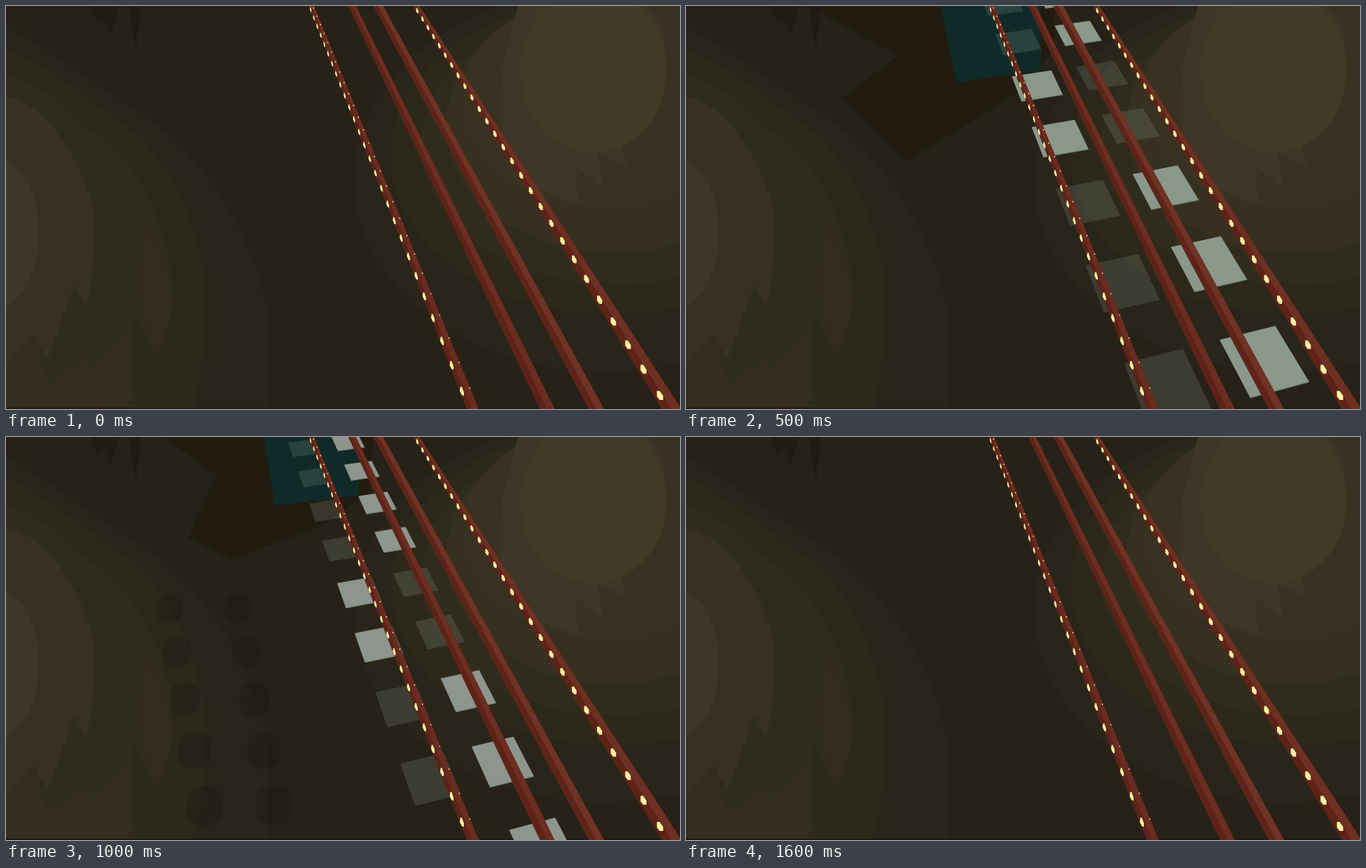
An HTML page for the animation above (1.7 s loop, 967x579 px).

```html
<!DOCTYPE html>
<html lang="en">
<head>
<meta charset="utf-8">
<title>Night rails</title>
<style>
html, body { margin: 0; width: 100%; height: 100%; overflow: hidden; background: #262217; }
svg { display: block; width: 967px; height: 579px; }
</style>
</head>
<body>
<svg viewBox="0 0 967 579" xmlns="http://www.w3.org/2000/svg">
  <rect width="967" height="579" fill="#262217"/>
  <g id="leftGlow">
    <path fill="#28251a" d="M0 30C60 60 150 130 200 160C290 220 370 350 378 470L375 579H0Z"/>
    <path fill="#2c291b" d="M0 60C70 90 150 160 190 185C250 250 285 340 286 430Q285 520 268 579H0Z"/>
    <path fill="#302c1d" d="M0 100C60 110 100 170 150 200C200 250 238 330 239 410Q236 480 215 503L182 440L188 579H0Z"/>
    <path fill="#342d1e" d="M0 579V520L38 470L60 545Q100 500 130 520L180 460V579Z"/>
    <path fill="#332b1d" d="M205 310Q240 380 238 430Q225 500 214 500Q190 440 190 380Z"/>
    <path fill="#383122" d="M0 130C50 140 100 200 125 290Q130 370 115 430L98 400L60 507L38 470L0 520Z"/>
    <path fill="#3e3626" d="M0 222C30 230 47 280 47 325C47 380 25 420 0 432Z"/>
  </g>
  <g id="rightGlow">
    <ellipse cx="860" cy="250" rx="360" ry="275" fill="#28251a"/>
    <ellipse cx="870" cy="215" rx="318" ry="228" fill="#2c291b"/>
    <ellipse cx="875" cy="200" rx="280" ry="200" fill="#302c1d"/>
    <ellipse cx="870" cy="170" rx="238" ry="185" fill="#353020"/>
    <ellipse cx="860" cy="135" rx="205" ry="155" fill="#393222"/>
    <path fill="#3e3626" d="M735 0Q700 100 712 190Q740 270 820 282L818 230L855 262L850 210L890 232L880 190Q950 150 948 80Q945 20 920 0Z"/>
    <ellipse cx="843" cy="92" rx="105" ry="118" fill="#423a29"/>
  </g>
  <path fill="#201c13" d="M121 0L131 27L141 20L151 40L162 0ZM175 0L187 70L194 0Z"/>
  <rect y="577" width="967" height="2" fill="#22170f"/>
  <g id="tower">
    <polygon id="shade" fill="#20170d" fill-opacity=".6"/>
    <g id="spots" fill="#000" fill-opacity=".13"></g>
    <polygon id="block" fill="#0f2a28"/>
    <g id="windows"></g>
  </g>
  <g id="rails"></g>
  <g id="lamps" fill="#fbf3a0"></g>
</svg>
<script>
const FRAME = 100, COUNT = 17;
const ROWS = [-4, 9], LIT_LEFT = [-3, 0, 5, 6], DIM_RIGHT = [-3, 0, 5, 6];
const $ = id => document.getElementById(id);

function add(parent, tag, attrs) {
  const el = document.createElementNS('http://www.w3.org/2000/svg', tag);
  for (const k in attrs) el.setAttribute(k, attrs[k]);
  return parent.appendChild(el);
}
const join = pts => pts.map(p => p[0].toFixed(1) + ',' + p[1].toFixed(1)).join(' ');

// A straight beam: left and right x at the top and bottom, split in two tones.
function rail(a, b, c, d, split, dark, light) {
  const m = a + (b - a) * split, n = c + (d - c) * split;
  add($('rails'), 'polygon', { points: join([[a, 0], [b, 0], [d, 579], [c, 579]]), fill: dark });
  add($('rails'), 'polygon', { points: join([[m, 0], [b, 0], [d, 579], [n, 579]]), fill: light });
}
rail(434, 442, 661, 678, .45, '#5c2318', '#6b2c20');
rail(491, 502, 766, 787, .5, '#5d2318', '#6b2e21');
rail(527, 541, 836, 858, .5, '#5e2419', '#6e3324');
rail(584, 593, 941, 969, .5, '#5d2218', '#6d3022');

// Lamps shrink towards the horizon, evenly spaced in depth.
function lamps(x0, y0, y1, slope, shape, speck) {
  const far = y0 + 665, near = y1 + 665, n = 26;
  const c = n * near / (near - far), k = far * c;
  for (let i = 0; i <= n; i++) {
    const y = k / (c - i) - 665, x = x0 + slope * (y - y0), s = (y + 665) / near;
    const sx = s * s * .7 + s * .3;
    add($('lamps'), 'polygon', { points: join(shape.map(p => [x + p[0] * sx, y + p[1] * s])) });
    if (speck) add($('lamps'), 'circle', { cx: x + 11.5 * sx, cy: y - 4 * s, r: .9 });
  }
}
lamps(437, 5, 553, .396, [[-2, -6], [0, -6], [3, 2], [3, 7], [0, 6], [-3, 0]], true);
lamps(590, 7, 560, .629, [[-4, -7], [0, -7], [5, 0], [5, 6], [0, 6], [-4, 1]], false);

const panes = [];
for (let row = ROWS[0]; row <= ROWS[1]; row++) {
  for (const col of [0, 1]) {
    const lit = col ? !DIM_RIGHT.includes(row) : LIT_LEFT.includes(row);
    const face = add($('windows'), 'polygon', lit ? {} : { fill: '#829084', 'fill-opacity': .24 });
    const edge = lit && add($('windows'), 'polyline', { fill: 'none', stroke: '#718b74', 'stroke-width': 1.3 });
    panes.push({ row, col, lit, face, edge });
  }
}

const spots = [];
for (let i = 0; i < 10; i++) spots.push(add($('spots'), 'rect', { rx: 18 }));

// Zoom eases in, runs evenly, then eases out.
function zoom(f) {
  if (f < 6) return 1.297 - .0057 * (f - 1) ** 2;
  if (f <= 12) return 1.1545 - .0598 * (f - 6);
  return .6533 + .0057 * (17 - f) ** 2;
}

// Perspective view of the window grid.
function project(col, row, q) {
  const v = 10.76 - row;
  const depth = 6.317 + q * (v + .22 * col);
  const x = 5140 + 1750 * (q - 1.035) + q * (178 * v + 1155 * col);
  return [x / depth, 1e4 / depth - 640];
}

const shadeA = [[160, 0], [305, 75], [215, 130], [315, 235], [480, 125], [530, 60], [530, 0]];
const shadeB = [[250, 0], [300, 50], [275, 148], [325, 157], [440, 130], [520, 85], [525, 0]];

function render(ms) {
  const f = Math.floor(ms / FRAME) % COUNT;
  const on = f > 0 && f < COUNT - 1;
  $('tower').style.display = on ? '' : 'none';
  if (!on) return;

  const q = zoom(f), m = (1.274 - q) / .479;
  $('shade').setAttribute('points', join(shadeA.map((p, i) =>
    p.map((a, j) => a + (shadeB[i][j] - a) * m))));
  $('block').setAttribute('points', join([
    [364.5 + 6.5 * m, 0], [388.5 - 3.5 * m, 111 - 7 * m - 12 * m * m],
    [509 - 5 * m * m, 94 - 6 * m - 10 * m * m], [509 - 3 * m * m, 0]]));

  spots.forEach((el, i) => {
    const y = 530 - 82 * (i % 5) + 2.8 * (i % 5) ** 2, s = (y + 640) / 1170;
    const x = 300 + (f - 8) * 42 - (530 - y) * (.1 + .04 * (f - 8)) - (i > 4 ? 100 : 0);
    const w = 50 * s, h = 56 * s;
    el.setAttribute('x', x - w / 2);
    el.setAttribute('y', y - h / 2);
    el.setAttribute('width', w);
    el.setAttribute('height', h);
    el.style.display = f < 7 || (i > 4 && (f < 9 || f > 11)) ? 'none' : '';
  });

  const mix = Math.max(0, Math.min(1, m));
  const tone = `rgb(${137 + 6 * mix},${153 - 5 * mix},${137 + 5 * mix})`;
  for (const p of panes) {
    const at = (dx, dy) => project(p.col + dx * .305, p.row + dy * .257, q);
    const box = [at(-1, -1), at(1, -1), at(1, 1), at(-1, 1)];
    p.face.setAttribute('points', join(box));
    if (p.lit) {
      p.face.setAttribute('fill', tone);
      p.edge.setAttribute('points', join([box[2], box[3]]));
    }
  }
}

const start = performance.now();
function tick() {
  render((performance.now() - start) % (FRAME * COUNT));
  requestAnimationFrame(tick);
}
tick();
</script>
</body>
</html>
```
